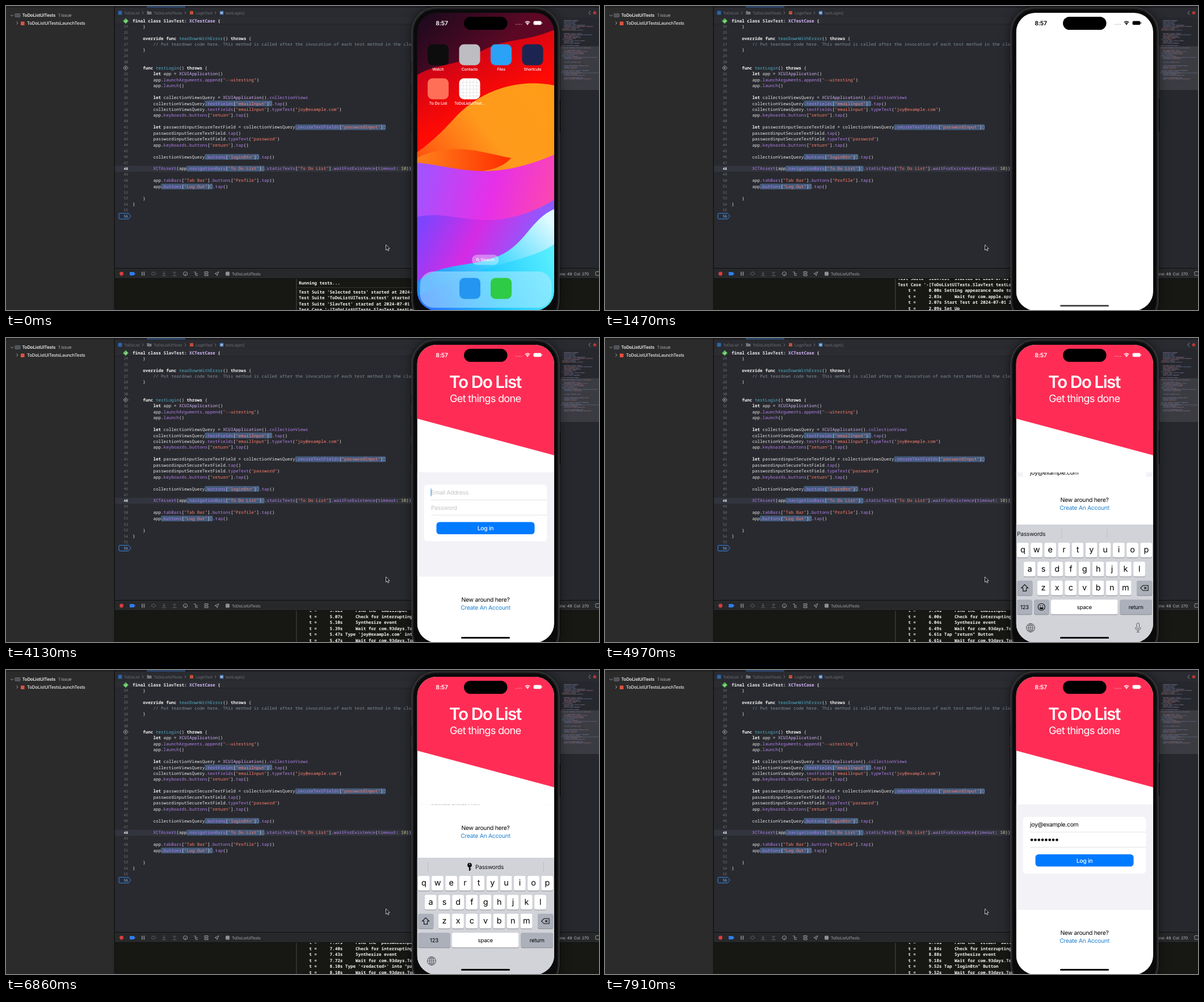
Write an HTML page with a canvas that moves like this. It is 1045 px wide and 536 px high and loops after 8 s.

```html
<!DOCTYPE html>
<html lang="en">
<head>
<meta charset="utf-8">
<title>UI test run</title>
<style>
html, body { margin: 0; width: 100%; height: 100%; overflow: hidden; background: #292a2f; }
canvas { display: block; }
</style>
</head>
<body>
<canvas id="stage" width="1045" height="536"></canvas>
<script>
const W = 1045, H = 536, LOOP = 8000;
const MAIL = 'joy@example.com';
const SANS = 'Inter, "Open Sans", sans-serif';
const MONO = '"Noto Sans Mono", "DejaVu Sans Mono", monospace';
const CW = 4.55, ROW = 10.45, MONO_SIZE = 7.58;
const S = { x: 724.5, y: 12, w: 241.5, h: 525, r: 34 };
const MID = 845;

const view = document.getElementById('stage').getContext('2d');
let c = view;

const clamp = v => Math.max(0, Math.min(1, v));
const ease = (t, a, b) => 1 - Math.pow(1 - clamp((t - a) / (b - a)), 3);
const mix = (a, b, k) => a + (b - a) * k;

function rect(x, y, w, h, fill) { c.fillStyle = fill; c.fillRect(x, y, w, h); }
function round(x, y, w, h, r, fill, stroke, lw = 1) {
  c.beginPath(); c.roundRect(x, y, w, h, r);
  if (fill) { c.fillStyle = fill; c.fill(); }
  if (stroke) { c.strokeStyle = stroke; c.lineWidth = lw; c.stroke(); }
}
function disc(x, y, r, fill) { c.beginPath(); c.arc(x, y, r, 0, 7); c.fillStyle = fill; c.fill(); }
function path(d, fill, stroke, lw = 1) {
  const p = new Path2D(d);
  if (fill) { c.fillStyle = fill; c.fill(p); }
  if (stroke) { c.strokeStyle = stroke; c.lineWidth = lw; c.stroke(p); }
}
function grad(x0, y0, x1, y1, ...cols) {
  const g = c.createLinearGradient(x0, y0, x1, y1);
  cols.forEach((col, i) => g.addColorStop(i / (cols.length - 1), col));
  return g;
}
// y is the middle of the capitals
function text(s, x, y, size, color, weight = 400, align = 'left') {
  c.font = `${weight} ${size}px ${SANS}`;
  c.letterSpacing = size * (size > 24 ? -0.05 : size > 15 ? -0.04 : -0.025) + 'px';
  c.textAlign = align;
  c.fillStyle = color;
  c.fillText(s, x, y + size * 0.364);
}
function mono(s, x, y, color, weight = 500, size = MONO_SIZE, align = 'left') {
  c.font = `${weight} ${size}px ${MONO}`;
  c.letterSpacing = '0px';
  c.textAlign = align;
  c.fillStyle = color;
  c.fillText(s, x, y + size * 0.35);
}
function layer(draw) {
  const cv = document.createElement('canvas');
  cv.width = W; cv.height = H;
  c = cv.getContext('2d');
  c.textRendering = 'geometricPrecision';
  draw();
  c = view;
  return cv;
}

// ---- editor ----
const CODE = {
  24: '    }',
  26: '    override func tearDownWithError() throws {',
  27: '        // Put teardown code here. This method is called after the invocation of each test method in the class.',
  28: '    }',
  31: '    func testLogin() throws {',
  32: '        let app = XCUIApplication()',
  33: '        app.launchArguments.append("--uitesting")',
  34: '        app.launch()',
  36: '        let collectionViewsQuery = XCUIApplication().collectionViews',
  37: '        collectionViewsQuery«.textFields["emailInput"]».tap()',
  38: `        collectionViewsQuery.textFields["emailInput"].typeText("${MAIL}")`,
  39: '        app.keyboards.buttons["return"].tap()',
  41: '        let passwordinputSecureTextField = collectionViewsQuery«.secureTextFields["passwordInput"]»',
  42: '        passwordinputSecureTextField.tap()',
  43: '        passwordinputSecureTextField.typeText("password")',
  44: '        app.keyboards.buttons["return"].tap()',
  46: '        collectionViewsQuery«.buttons["loginBtn"]».tap()',
  48: '        XCTAssert(app«.navigationBars["To Do List"]».staticTexts["To Do List"].waitForExistence(timeout: 10))',
  50: '        app.tabBars["Tab Bar"].buttons["Profile"].tap()',
  51: '        app«.buttons["Log Out"]».tap()',
  53: '    }',
  54: '}'
};
const TOKENS = /(?<str>"[^"]*")|(?<com>\/\/.*)|(?<key>\b(?:final|class|override|func|let|throws)\b)|(?<decl>\b(?:testLogin|tearDownWithError)\b)|(?<type>\bXCUIApplication\b|\bXCTestCase\b)|(?<mem>(?<=\.)\w+|\bXCTAssert\b|\btimeout\b)|(?<num>\b\d+\b)|\w+|[^\s\w"]/g;
const INK = { str: '#ff8170', com: '#7f8c98', key: '#f4f4f4', decl: '#4eb0cc', type: '#dabaff', mem: '#b281eb', num: '#d9c97c' };

function codeLine(src, y, bold) {
  const x0 = 223, a = src.indexOf('«'), b = src.indexOf('»') - 1;
  if (a >= 0) {
    round(x0 + a * CW, y - 5, (b - a + 1) * CW, 10, 1.5, '#435b7d');
    round(x0 + b * CW + 0.6, y - 3, 3.6, 6, 1, null, '#7d93b3', 0.7);
  }
  for (const m of src.replace('«', '').replace('»', ' ').matchAll(TOKENS)) {
    const kind = Object.keys(INK).find(k => m.groups[k]);
    mono(m[0], x0 + m.index * CW, y, INK[kind] || '#e6e6e8', bold || kind === 'key' ? 700 : 500);
  }
}

function minimap() {
  rect(976, 20, 69, 443, '#26282e');
  rect(977, 71, 68, 77, '#3b3c42');
  let seed = 11;
  const rnd = () => (seed = seed * 16807 % 2147483647) / 2147483647;
  const cols = ['#5e5a72', '#6c6680', '#55617a', '#7a5c62'];
  for (let y = 23; y < 128; y += 2.1) {
    if (rnd() < 0.25) continue;
    let x = 980 + (rnd() < 0.7 ? 3 : 0);
    for (let n = 1 + rnd() * 3; n > 0; n--) {
      const w = 4 + rnd() * 12;
      rect(x, y, w, 1, cols[Math.floor(rnd() * 4)]);
      x += w + 1.2;
    }
  }
  rect(977, 117.5, 68, 1, '#555a66');
}

function debugBar() {
  rect(192, 462, 853, 19, '#27282a');
  rect(192, 462, 853, 1, '#0f0f10');
  rect(192, 480, 853, 1, '#0f0f10');
  disc(203.5, 472, 3.4, '#dc3d3d');
  path('M218 469h7l3 3l-3 3h-7z', '#2f7cf0');
  rect(239, 468.5, 1.6, 7, '#8f9092');
  rect(242.6, 468.5, 1.6, 7, '#8f9092');
  const dim = '#606163', mid = '#98999b';
  path('M256 472q4-6 8 0l-4 3z', null, dim);
  path('M278.5 468v5m-2.5-2l2.5 2.5l2.5-2.5M275 475.5h7', null, dim);
  path('M297 474v-5m-2.5 2l2.5-2.5l2.5 2.5M293.500 475.5h7', null, dim);
  path('M316 468.500l3.300 1.700v3.700l-3.300 1.700l-3.300-1.700v-3.700zM316 472v3', null, mid);
  path('M331 469h3v3h4M334 472v3h4', null, mid);
  path('M350 468.500h6v2.600h-6zM350 473h6v2.600h-6z', null, mid);
  path('M368 472l7-3.500l-3 7l-1-3z', null, mid);
  round(387, 468.500, 7, 7, 1.500, '#8f9092');
  text('ToDoListUITests', 398, 472, 6.9, '#a6a7a9');
  text('Line: 48  Col: 270', 1027, 472, 7, '#b9babc', 400, 'right');
  round(1039, 468.500, 7, 6.500, 1, null, mid);
}

function editor() {
  rect(0, 0, W, H, '#292a2f');
  rect(0, 0, 191, H, '#2b2b2b');
  rect(0, 0, 191, 3, '#222');
  rect(190.500, 0, 1.500, H, '#121213');
  path('M8 15.500l2.500 2.500l2.500-2.500', null, '#a4a4a4');
  round(16, 13.500, 9, 6, 1, '#4d5358', '#777c80', 0.6);
  text('ToDoListUITests', 28.500, 16.500, 7.8, '#ececec', 600);
  text('1 issue', 92, 16.500, 7.8, '#b0b0b0');
  path('M18.500 27.500l2.500 2.500l-2.500 2.500', null, '#a4a4a4');
  rect(26, 27.500, 6.500, 6.500, '#e0523f');
  text('ToDoListUITestsLaunchTests', 37, 30.500, 7.8, '#e8e8e8', 500);

  rect(192, 0, 853, 3, '#1d1e21');
  rect(248, 0, 68, 3, '#2a4468');
  rect(192, 3, 853, 17, '#292b30');
  const crumb = '#6d6f75';
  round(197.500, 8.500, 7, 7, 1.500, '#2d64a8');
  text('ToDoList', 208, 12, 6.9, crumb);
  path('M248.500 9h3l1 1h4v5h-8z', '#74767a');
  text('ToDoListUITests', 260, 12, 6.9, crumb);
  rect(324, 9, 6, 6, '#c04f38');
  text('LoginTest', 334, 12, 6.9, crumb);
  round(376.500, 8.500, 7, 7, 1.500, '#3f6fa8');
  text('M', 380, 12, 5, '#d5deea', 700, 'center');
  text('testLogin()', 387, 12, 6.9, crumb);
  for (const x of [240, 315, 368]) path(`M${x} 9.500l2 2.500l-2 2.500`, null, crumb);
  path('M1030 8.500l-3 3.500l3 3.500', null, '#8a8b8f');
  disc(1037.500, 12, 2.600, '#d8413c');
  path('M1034 12h7M1037.500 8.500v7', null, '#8d2f30', 0.8);

  rect(192, 281.700, 523, ROW, '#32353e');
  for (let n = 24; n <= 56; n++) {
    const y = 36 + (n - 24) * ROW;
    if (n === 56) path('M200.500 365.500h15.500l4 5l-4 5h-15.500q-1.500 0-1.500-1.500v-7q0-1.500 1.500-1.500z', '#232c3b', '#3f86dc');
    if (n !== 31) mono(n, 215, y, n === 48 ? '#f2f2f2' : n === 56 ? '#a9c6ea' : '#74777e', n === 48 ? 700 : 400, 6.3, 'right');
    if (CODE[n]) codeLine(CODE[n], y);
  }
  path('M211 104.800l4.300 4.300l-4.300 4.300l-4.300-4.300z', '#35373c', '#9a9ca1');
  path('M209.700 107.200l3 1.900l-3 1.900z', '#9a9ca1');
  rect(192, 20, 523, 12, '#2b2d32');
  rect(192, 31.500, 523, 0.800, '#1f2023');
  path('M211 21.500l5 5l-5 5l-5-5z', '#57b955');
  path('M209 26.500l1.500 1.700l2.700-3.200', null, '#fff');
  codeLine('final class SlavTest: XCTestCase {', 26.500, true);
  minimap();

  rect(192, 481, 853, 55, '#171814');
  rect(511, 481, 1.500, 55, '#38393b');
  debugBar();
  path('M669.500 421v9.500l2.200-2l1.500 3.300l1.500-.7l-1.500-3.200h3z', '#111', '#e8e8e8', 0.8);
}

// ---- console ----
const idle = '    Wait for com.93days.ToDoList to idle';
const checks = '    Check for interrupting elements affecting "element"';
const event = '    Synthesize event';
const LOG = [
  [0, 0, 'Running tests...'],
  [0, 0, "Test Suite 'Selected tests' started at 2024-07-01 20:57:10.214."],
  [0, 0, "Test Suite 'ToDoListUITests.xctest' started at 2024-07-01 20:57:10.215."],
  [0, 0, "Test Suite 'SlavTest' started at 2024-07-01 20:57:10.215."],
  [0, 0, "Test Case '-[ToDoListUITests.SlavTest testLogin]' started."],
  [280, '0.00', 'Setting appearance mode to Light'],
  [770, '2.03', '    Wait for com.apple.springboard to idle'],
  [1120, '2.07', 'Start Test at 2024-07-01 20:57:12.285'],
  [1190, '2.09', 'Set Up'],
  [1960, '2.09', 'Open com.93days.ToDoList'],
  [2310, '2.12', '    Launch com.93days.ToDoList'],
  [2730, '3.91', idle],
  [3080, '4.60', 'Tap "emailInput" TextField'],
  [3080, '4.60', idle],
  [3220, '5.02', '    Find the "emailInput" TextField'],
  [3220, '5.07', checks],
  [3290, '5.10', event],
  [3570, '5.39', idle],
  [4130, '5.47', `Type '${MAIL}' into "emailInput" TextField`],
  [4130, '5.47', idle],
  [4340, '5.94', '    Find the "emailInput" TextField'],
  [4550, '6.00', checks],
  [4550, '6.04', event],
  [4760, '6.49', idle],
  [4970, '6.61', 'Tap "return" Button'],
  [4970, '6.61', idle],
  [5250, '6.70', '    Find the "return" Button'],
  [5320, '6.74', checks],
  [5320, '6.78', event],
  [5740, '7.30', 'Tap "passwordInput" SecureTextField'],
  [5740, '7.37', '    Find the "passwordInput" SecureTextField'],
  [6020, '7.40', checks],
  [6020, '7.43', event],
  [6370, '7.72', idle],
  [6860, '8.10', 'Type \'<redacted>\' into "passwordInput" SecureTextField'],
  [6860, '8.10', idle],
  [7000, '8.60', 'Tap "return" Button'],
  [7210, '8.78', '    Find the "return" Button'],
  [7210, '8.84', checks],
  [7280, '8.88', event],
  [7560, '9.18', idle],
  [7840, '9.52', 'Tap "loginBtn" Button'],
  [7840, '9.52', idle]
];

function consoleText(t) {
  const shown = LOG.filter(l => l[0] <= t), last = shown.length - 1;
  const bottom = last > 4 ? 533 : 535.300;
  c.save();
  c.beginPath(); c.rect(513, 481, 463, 55); c.clip();
  for (let i = last; i >= Math.max(0, last - 6); i--) {
    const [, sec, msg] = shown[i];
    const y = bottom - (last - i) * ROW - (i ? 0 : 5.300);
    mono(sec ? `    t =     ${sec}s ${msg}` : msg, 516, y, '#f3f3f3', 600);
    if (!i) rect(513, y + 8, 463, 0.800, '#3a3b3a');
  }
  c.restore();
}

// ---- phone ----
function body() {
  for (const [x, y, h] of [[712.500, 98, 20], [712.500, 137, 35], [712.500, 184, 39], [974.500, 163, 59]]) round(x, y, 4, h, 1, '#1a1a1c', '#3a3a3d', 0.6);
  c.shadowColor = 'rgba(0,0,0,.55)'; c.shadowBlur = 18;
  round(715, 2.500, 260, 560, 43, '#0a0a0b');
  c.shadowBlur = 0;
  round(715.500, 3, 259, 559, 42.500, null, '#4b4b4e', 1.200);
  round(717.500, 5, 255, 555, 40.500, null, '#232325', 1.500);
}

function wallpaper() {
  rect(S.x, S.y, S.w, S.h, grad(730, 60, 800, 200, '#b50020', '#ff0a04'));
  path('M724 12H966V42C910 66 880 54 830 84C790 108 760 100 724 122Z', grad(740, 12, 830, 110, '#1d0a1e', '#5c0824'));
  path('M966 140C895 126 832 154 792 196C765 226 742 246 724 258V340H966Z', grad(950, 150, 750, 300, '#ff9c17', '#ff9a1c', '#ff5210'));
  path('M724 268C790 236 850 262 890 268C868 296 800 300 724 284Z', grad(740, 270, 890, 275, '#ff7a18', '#ff2c00'));
  path('M724 276C800 284 850 312 966 262V537H724Z', grad(724, 340, 966, 400, '#a452ff', '#e62fe8', '#ff4aa8'));
  path('M724 372C790 356 850 410 966 342V537H724Z', grad(730, 380, 900, 470, '#7a45ff', '#d52be4', '#8b5cff'));
  path('M966 358C925 376 915 420 870 440C820 462 770 450 724 486V537H966Z', grad(950, 370, 780, 530, '#dffaff', '#42d8ff', '#1e8dff'));
  path('M966 420C920 452 850 450 724 512V537H966Z', grad(960, 430, 740, 530, '#59efff', '#22c9ff', '#2a74ff'));
}

function home() {
  wallpaper();
  const icon = (x, y, fill, label) => {
    round(x - 18.500, y - 18.500, 37, 37, 8.500, fill);
    if (label) text(label, x, y + 25.300, 7, '#fff', 500, 'center');
  };
  icon(761.500, 86, '#0d0d0e', 'Watch');
  icon(817, 86, '#bdbdc2', 'Contacts');
  icon(872.500, 86, '#2aa2f6', 'Files');
  icon(928, 86, '#1c2552', 'Shortcuts');
  icon(761.500, 146, '#ff6f57', 'To Do List');
  icon(817, 146, '#fdfdfd', 'ToDoListUITest...');
  for (let i = -2; i <= 2; i++) {
    rect(817 + i * 6, 128, 0.500, 36, '#d6d6d8');
    rect(799, 146 + i * 6, 36, 0.500, '#d6d6d8');
  }
  round(821, 438.500, 47.500, 18, 9, 'rgba(255,255,255,.36)');
  c.beginPath(); c.arc(831, 447, 2.100, 0, 7); c.moveTo(832.600, 448.600); c.lineTo(834.500, 450.500);
  c.strokeStyle = '#fff'; c.lineWidth = 1; c.stroke();
  text('Search', 836.500, 447.500, 7.5, '#fff', 500);
  round(729.500, 468, 232, 64, 24, 'rgba(190,238,255,.5)');
  icon(817.500, 498, '#2495f0');
  icon(872.500, 498, '#2ecb46');
}

function statusBar(color, dots) {
  round(807, 19, 76.500, 23, 11.500, '#000');
  text('8:57', 768, 30, 10.4, color, 600, 'center');
  for (let i = 0; i < 4; i++) disc(898.800 + i * 3.200, 32.300, 0.900, dots);
  c.strokeStyle = color; c.lineWidth = 1.500;
  for (const r of [3.400, 6]) { c.beginPath(); c.arc(919, 33.300, r, -2.330, -0.810); c.stroke(); }
  path('M919 33.800l-1.700-2q1.700-1 3.400 0z', color);
  round(929.500, 26.500, 14, 6.800, 2.200, color);
  rect(944.200, 28.800, 0.900, 2.300, color);
}

const KEY = '#fff', GREY = '#abb0ba';
function key(x, y, w, label, fill, size) {
  round(x, y - 12, w, 26, 3.200, '#898b90');
  round(x, y - 13, w, 26, 3.200, fill);
  if (label) text(label, x + w / 2, y - (size > 12 ? 1 : 0), size, '#000', 400, 'center');
}
function keyboard(off, secure) {
  const top = (secure ? 331 : 329) + off;
  rect(S.x, top, S.w, 230, '#d1d3d9');
  const bar = top + 16;
  for (const x of secure ? [743, 947] : [804.500, 884.500]) rect(x, bar - 8, 0.800, 16, '#b6b8be');
  if (secure) {
    disc(817, bar - 3, 3.900, '#111');
    rect(815.900, bar, 2.300, 7, '#111');
    rect(818, bar + 3, 1.500, 1.500, '#111');
    disc(817, bar - 4.500, 0.900, '#d1d3d9');
  }
  text('Passwords', secure ? 827 : 726, bar, 10.2, '#111');
  const y = [0, 1, 2, 3].map(i => top + 45 + i * 33.400);
  const row = (s, x, yy) => [...s].forEach((ch, i) => key(x + i * 24.150, yy, 20.800, ch, KEY, 14.4));
  row('qwertyuiop', 725.900, y[0]);
  row('asdfghjkl', 737.900, y[1]);
  row('zxcvbnm', 761.900, y[2]);
  key(726, y[2], 27.300, '', GREY);
  key(937, y[2], 27.300, '', GREY);
  c.save();
  c.translate(739.600, y[2]);
  path('M0-6l6 6h-3v5.300h-6v-5.300h-3z', null, '#111', 1.100);
  c.translate(211, 0);
  path('M-7 0l4.500-4.500h9v9h-9zM-.5-2l4 4m0-4l-4 4', null, '#111', 1.100);
  c.restore();
  key(726, y[3], secure ? 57 : 26.500, '123', GREY, 9.6);
  if (!secure) {
    key(756, y[3], 26.500, '', GREY);
    c.strokeStyle = '#111'; c.lineWidth = 1.100;
    c.beginPath(); c.arc(769.200, y[3], 6, 0, 7); c.stroke();
    disc(767.200, y[3] - 1.800, 0.900, '#111');
    disc(771.200, y[3] - 1.800, 0.900, '#111');
    c.beginPath(); c.arc(769.200, y[3] + 0.800, 3.400, 0, Math.PI); c.fill();
  }
  key(786, y[3], 117.500, 'space', KEY, 9.6);
  key(907.500, y[3], 56.500, 'return', GREY, 9.6);
  const g = top + 182;
  c.strokeStyle = '#55575c'; c.lineWidth = 1;
  for (const rx of [7.500, 3.500]) { c.beginPath(); c.ellipse(750, g, rx, 7.500, 0, 0, 7); c.stroke(); }
  path(`M750 ${g - 7.500}v15M742.500 ${g}h15M744 ${g - 4}h12M744 ${g + 4}h12`, null, '#55575c', 0.9);
  if (!secure) {
    round(937, g - 8.500, 4.600, 10, 2.300, null, '#55575c');
    path(`M934.500 ${g - 1}q0 5 4.800 5t4.800-5M939.300 ${g + 4}v3.500m-2.500 0h5`, null, '#55575c');
  }
}

function login(t) {
  const secure = t > 5900;
  const k = ease(t, 4130, 4340) - ease(t, 5250, 5740) + ease(t, 6300, 6510) - ease(t, 7210, 7770);
  const foot = mix(463.500, secure ? 278 : 285, k), listEnd = foot - 40.500, dy = -35.500 * k;
  const mail = MAIL.slice(0, t < 4550 ? 0 : t < 4760 ? 8 : 15);
  const dots = t < 6650 ? 0 : t < 6860 ? 4 : 8;

  rect(S.x, S.y, S.w, S.h, '#fff');
  path('M724 12H966.500V207L724 142Z', '#ff2d55');
  text('To Do List', MID - 0.500, 77, 29.8, '#fff', 600, 'center');
  text('Get things done', MID - 0.300, 106.500, 18.2, '#fff', 400, 'center');

  c.save();
  c.beginPath(); c.rect(S.x, 237, S.w, listEnd - 237); c.clip();
  rect(S.x, 237, S.w, 190, '#f2f2f7');
  c.translate(0, dy);
  round(736.500, 259, 217, 100, 6.200, '#fff');
  rect(749, 285.500, 204.500, 0.700, '#d6d6d9');
  rect(749, 312.300, 204.500, 0.700, '#d6d6d9');
  text(mail || 'Email Address', 749, 272.500, 10.3, mail ? '#000' : '#c3c3c6');
  if (!dots) text('Password', 749, 299.500, 10.3, '#c3c3c6');
  for (let i = 0; i < dots; i++) disc(752 + i * 6.330, 299.500, 2.350, '#000');
  if (t >= 3220 && t < 4550) rect(748.500, 266, 1.200, 13.500, t < 3430 ? '#a9cdf8' : '#4c98ee');
  round(758.500, 325, 173, 21.500, 5.500, '#007aff');
  text('Log in', MID, 336, 10.4, '#fff', 500, 'center');
  c.restore();

  text('New around here?', MID, foot, 10.3, '#000', 400, 'center');
  text('Create An Account', MID, foot + 14, 10.3, '#1f7fcc', 400, 'center');
  if (k > 0) keyboard((1 - k) * 210, secure);
}

function screen(t) {
  c.save();
  c.beginPath(); c.roundRect(S.x, S.y, S.w, S.h, S.r); c.clip();
  const open = ease(t, 680, 1330), fade = clamp((t - 1930) / 240);
  if (open < 1) {
    c.drawImage(homeLayer, 0, 0);
    if (open > 0) {
      c.globalAlpha = clamp(open * 4);
      round(mix(799, S.x, open), mix(128, S.y, open), mix(36, S.w, open), mix(36, S.h, open), mix(8, S.r, open), '#fff');
      c.globalAlpha = 1;
    }
  } else if (fade < 1) rect(S.x, S.y, S.w, S.h, '#fff');
  if (fade > 0) {
    c.globalAlpha = fade;
    login(t);
    c.globalAlpha = 1;
  }
  const dark = open > 0.900 && t < 2520;
  statusBar(dark ? '#000' : '#fff', dark ? '#b9b9bd' : 'rgba(255,255,255,.45)');
  if (open > 0.900) round(802, 527, 86, 3, 1.500, dark ? '#4c4c4e' : '#000');
  c.restore();
}

const editorLayer = layer(editor), bodyLayer = layer(body), homeLayer = layer(home);
view.textRendering = 'geometricPrecision';
const start = performance.now();
function frame() {
  const t = (performance.now() - start) % LOOP;
  c.drawImage(editorLayer, 0, 0);
  consoleText(t);
  c.drawImage(bodyLayer, 0, 0);
  screen(t);
  requestAnimationFrame(frame);
}
frame();
</script>
</body>
</html>
```
